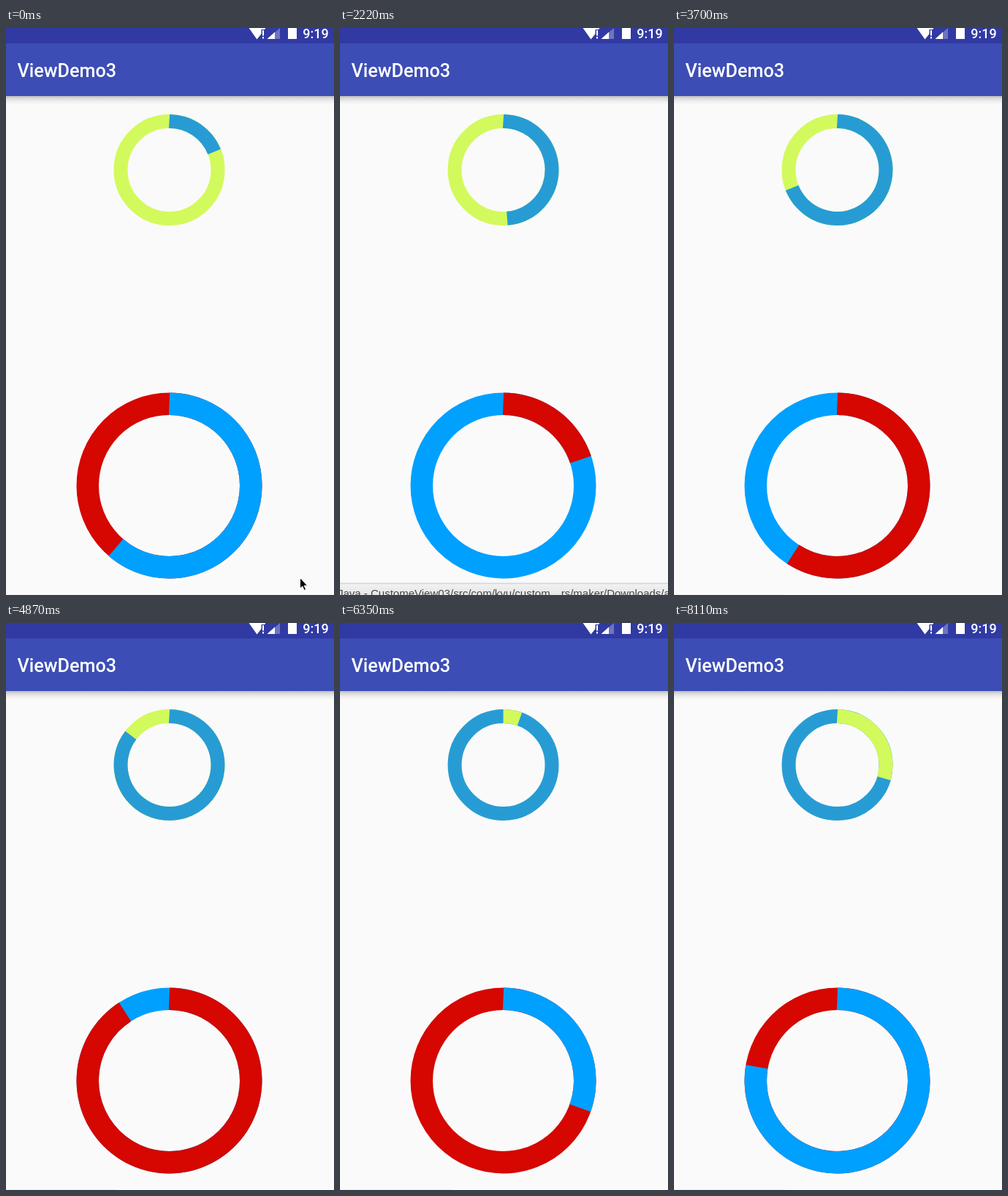
Write an HTML page that moves like this. It is 449 px wide and 775 px high and loops after 8.22 s.

```html
<!DOCTYPE html>
<html lang="en">
<head>
<meta charset="utf-8">
<title>Ring progress</title>
<style>
  html, body { margin: 0; width: 100%; height: 100%; overflow: hidden; background: #fafafa; }
  svg { display: block; width: 449px; height: 775px; }
  .bar { font-family: Roboto, sans-serif; font-weight: 500; fill: #fff; }
  .window { font: 15px "Liberation Sans", Arial, sans-serif; fill: #484848; }
</style>
</head>
<body>
<svg viewBox="0 0 449 775">
  <defs>
    <linearGradient id="shade" x2="0" y2="1">
      <stop offset="0" stop-color="#bdbdbd"/>
      <stop offset=".3" stop-color="#dcdcdc"/>
      <stop offset=".65" stop-color="#f0f0f0"/>
      <stop offset="1" stop-color="#fafafa"/>
    </linearGradient>
    <linearGradient id="chrome" x2="0" y2="1">
      <stop offset="0" stop-color="#f1f1f1"/>
      <stop offset="1" stop-color="#e6e6e6"/>
    </linearGradient>
  </defs>
  <rect width="449" height="775" fill="#fafafa"/>
  <rect y="93" width="449" height="12" fill="url(#shade)"/>
  <rect y="21" width="449" height="72" fill="#3c4db6"/>
  <rect width="449" height="21" fill="#303aa2"/>

  <g fill="#fff">
    <path d="M332.5 0H355.5L354 2H349.5V8L343.5 15.5Z"/>
    <path d="M351 3h2v7.5h-2zM351 12h2v2.5h-2z"/>
    <path d="M357.5 15L375 0V15Z" opacity=".3"/>
    <path d="M357.5 15L368 5.5V15Z"/>
    <rect x="386" y="0" width="12" height="15"/>
  </g>
  <text class="bar" x="406.3" y="14" font-size="18">9:19</text>
  <text class="bar" x="15.5" y="67" font-size="25.2">ViewDemo3</text>

  <g id="rings"></g>

  <rect id="edge" y="774" height="1" fill="#ededed"/>
  <g id="window">
    <rect y="757" width="449" height="2" fill="#f0f0f0"/>
    <rect y="759" width="449" height="1" fill="#cfcfcf"/>
    <rect y="760" width="449" height="15" fill="url(#chrome)"/>
    <text class="window" x="-3" y="777.5">Java - CustomeView03/src/com/kvu/custom…rs/maker/Downloads/a</text>
  </g>
  <path id="cursor" d="M402.5 751.5V766L405.8 763L408.2 768.6L410.6 767.5L408.2 762.2H412.6Z"
        fill="#000" stroke="#fff" stroke-width="1"/>
</svg>
<script>
const LOOP = 8220;
const byId = id => document.getElementById(id);

// The picture steps at [first, last, count] evenly spaced moments.
const runs = [[140, 1170, 8], [1320, 2360, 8], [2510, 3550, 8], [3700, 4720, 8],
              [4870, 5910, 8], [6060, 7090, 8], [7240, 8110, 7]];
const ticks = [0, ...runs.flatMap(([first, last, n]) =>
  Array.from({ length: n }, (_, i) => Math.round((first + (last - first) * i / (n - 1)) / 10) * 10))];

// Accumulated sweep in degrees at a few moments; linear in between.
const keyTimes = [0, 1470, 2960, 3700, 4870, 6350, 8110];

function makeRing(cy, outer, inner, colors, sweeps) {
  const cx = 223.5;
  const ns = "http://www.w3.org/2000/svg";
  const base = document.createElementNS(ns, "circle");
  const arc = document.createElementNS(ns, "path");
  base.setAttribute("cx", cx);
  base.setAttribute("cy", cy);
  base.setAttribute("r", (outer + inner) / 2);
  base.setAttribute("stroke-width", outer - inner);
  base.setAttribute("fill", "none");
  byId("rings").append(base, arc);

  return t => {
    const total = sweepAt(t, sweeps);
    const angle = total % 360;
    const turn = Math.floor(total / 360) % 2;
    const rad = angle * Math.PI / 180;
    const large = angle > 180 ? 1 : 0;
    const lean = angle > 60 ? 0.6 : 0;
    const point = r => `${cx + r * Math.sin(rad)} ${cy - r * Math.cos(rad)}`;
    base.setAttribute("stroke", colors[1 - turn]);
    arc.setAttribute("fill", colors[turn]);
    arc.setAttribute("d", `M${cx + lean} ${cy - outer}A${outer} ${outer} 0 ${large} 1 ${point(outer)}` +
      `L${point(inner)}A${inner} ${inner} 0 ${large} 0 ${cx - lean} ${cy - inner}Z`);
  };
}

function sweepAt(t, sweeps) {
  let i = 0;
  while (i < keyTimes.length - 2 && t >= keyTimes[i + 1]) i++;
  const k = (t - keyTimes[i]) / (keyTimes[i + 1] - keyTimes[i]);
  return sweeps[i] + (sweeps[i + 1] - sweeps[i]) * k;
}

const rings = [
  makeRing(194, 76, 57, ["#279cd4", "#d2fa5c"], [68, 138.7, 212.6, 248.4, 307.6, 379.7, 466]),
  makeRing(625.5, 127, 96.5, ["#00a0ff", "#d50700"], [220.8, 361, 502.7, 572.8, 687.2, 829.6, 999.7])
];

const show = (id, on) => byId(id).setAttribute("visibility", on ? "visible" : "hidden");

function draw(time) {
  const t = ticks.findLast(tick => tick <= time);
  rings.forEach(ring => ring(t));
  show("cursor", t < 1320);
  show("window", t >= 2060 && t < 3330);
  byId("edge").setAttribute("width", t < 2060 ? 449 : 152);
}

const start = performance.now();
function loop() {
  draw((performance.now() - start) % LOOP);
  requestAnimationFrame(loop);
}
loop();
</script>
</body>
</html>
```
